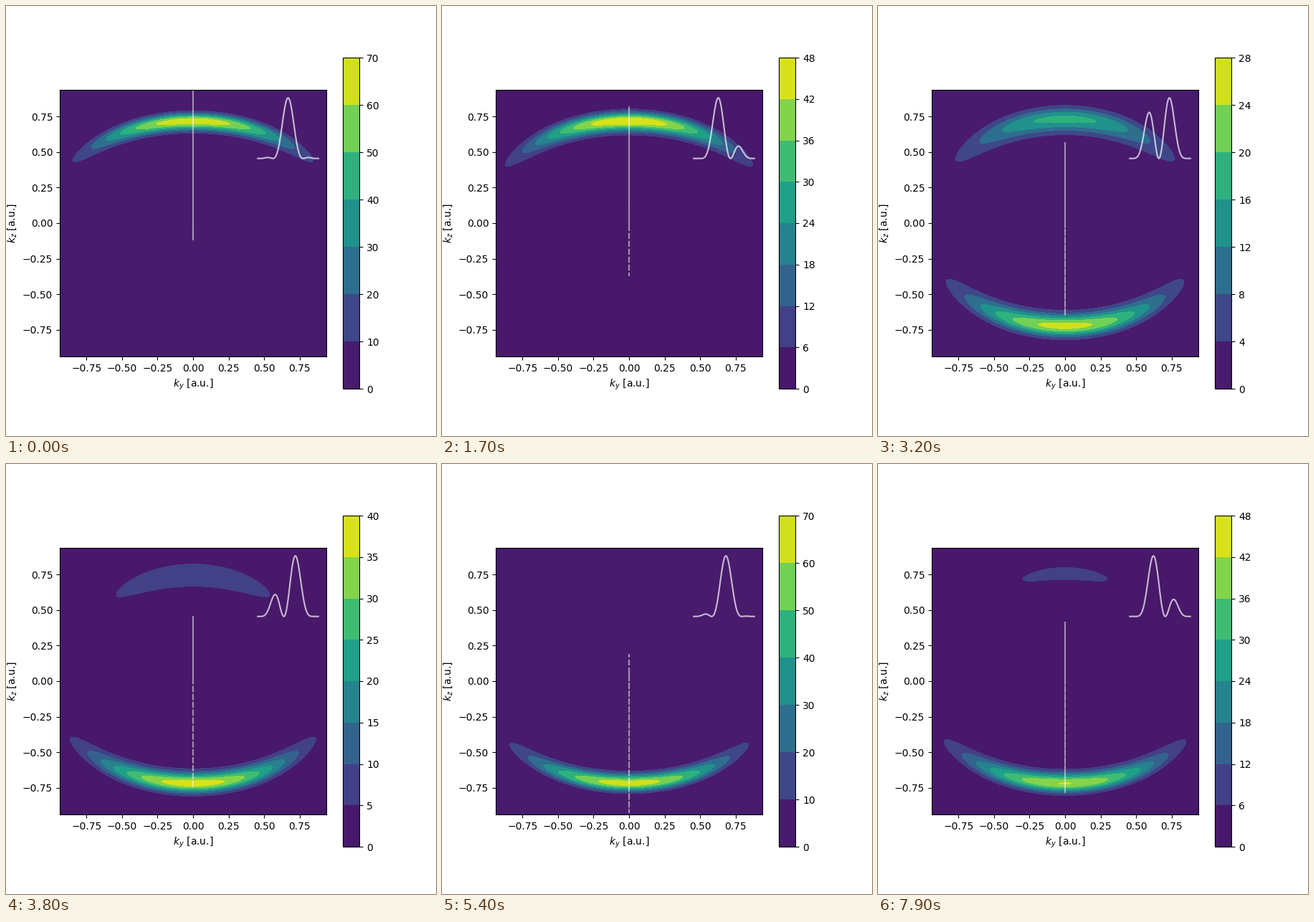
Recreate the animation shown at these times as a matplotlib script. Size 600x600 px, loop 8 s.

```python
import numpy as np
import matplotlib.pyplot as plt
from matplotlib.animation import FuncAnimation

plt.rcParams["path.simplify"] = False  # keeps the retraced dashes intact

FRAMES = 80
STEP = 2 * np.pi / 119  # carrier phase advance per frame
A0 = 0.9373             # peak field over frequency, also the axis limit

k = np.linspace(-A0, A0, 401)
KY, KZ = np.meshgrid(k, k)
u = np.linspace(-np.pi / 2, np.pi / 2, 300)


def field(phase):
    """Single-cycle pulse with a cos^2 envelope."""
    return np.cos(u) ** 2 * np.cos(2 * u + phase)


def lobe(e, sign):
    """Crescent of electrons released by a field extremum of strength e."""
    bend = 1 + 1.7 * (1 - e) ** 2
    ridge = 0.718 + 0.24 * (1 - e) ** 3 - bend * (0.3 * KY**2 + 0.12 * KY**4)
    slope = bend * (0.6 * KY + 0.48 * KY**3)
    d = (sign * KZ - ridge) / np.sqrt(1 + slope**2)
    width = 0.00324 * e**-1.6 * np.where(d < 0, 1.08, 0.92) ** 2
    peak = 67.2 * e ** (2.5 + 0.5 * (1 - e))
    return peak * np.exp(-1.6 * KY**2 - 1.5 * KY**4 - d**2 / width)


def spectrum(phase):
    total = np.zeros_like(KY)
    for n in range(-1, 4):
        at = (n * np.pi - phase) / 3
        e = np.cos(at) ** 3
        if abs(at) < np.pi / 2 and e > 0.02:
            total += lobe(e, (-1) ** n)
    return total


fig = plt.figure(figsize=(6, 6), dpi=100)
ax = fig.add_axes([0.125, 0.11, 0.62, 0.77])
ax.set(xlim=(-A0, A0), ylim=(-A0, A0), aspect="equal",
       xlabel="$k_y$ [a.u.]", ylabel="$k_z$ [a.u.]")
trace, = ax.plot(0 * u, A0 * field(0), "--", color="white", alpha=0.5)

corner = 0.75 - 5 / 72 * 100 / 372
inset = ax.inset_axes([corner, corner, 0.25, 0.25])
inset.axis("off")
inset.set(xlim=(-0.55 * np.pi, 0.55 * np.pi), ylim=(-0.05, 1.05))
pulse, = inset.plot(u, field(0) ** 2, color="white", alpha=0.7)

shown = []


def update(i):
    phase = i * STEP
    while shown:
        shown.pop().remove()
    fill = ax.contourf(KY, KZ, spectrum(phase))
    cax = fig.add_axes([470.25 / 600, 0.11, 23.1 / 600, 0.77])
    fig.colorbar(fill, cax=cax)
    shown.extend([fill, cax])

    e = field(phase)
    trace.set_ydata(A0 * e)
    pulse.set_ydata(e**2 / np.max(e**2))
    return []


anim = FuncAnimation(fig, update, frames=FRAMES, interval=100,
                     init_func=lambda: [], repeat=True)
plt.show()
```
